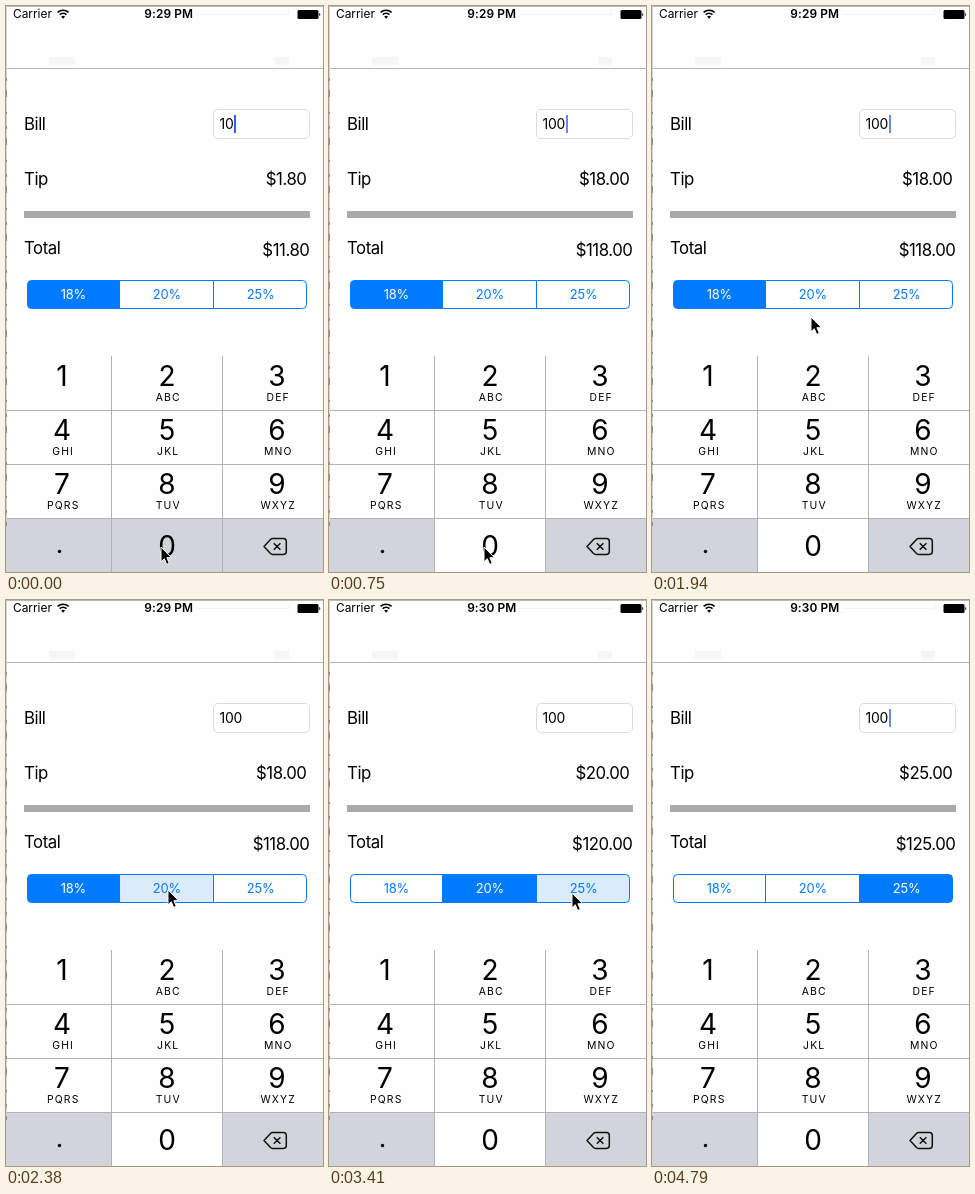
An HTML page for the animation above (4.89 s loop, 317 px wide and 566 px high).

```html
<!DOCTYPE html>
<html lang="en">
<head>
<meta charset="utf-8">
<title>Tip calculator</title>
<style>
  html, body { margin: 0; width: 100%; height: 100%; overflow: hidden; background: #fefefe; }
  svg { display: block; width: 317px; height: 566px; font-family: Inter, Roboto, sans-serif; cursor: default; }
  .label { font-size: 16.8px; letter-spacing: -.45px; }
  .end { text-anchor: end; }
  .mid { text-anchor: middle; }
  .seg { font-size: 12.9px; letter-spacing: -.2px; }
  .digit { font-size: 28px; }
  .sub { font-size: 10.4px; letter-spacing: 1.15px; }
</style>
</head>
<body>
<svg id="stage" viewBox="0 0 317 566">
  <rect width="317" height="566" fill="#fefefe"/>

  <!-- window edge and navigation bar -->
  <path d="M0 .5H317" stroke="#b9b9b9"/>
  <path d="M.5 0V566" stroke="#d4d4d4"/>
  <path d="M.5 72V520" stroke="#8d8f96" stroke-dasharray="3 9 7 15 2 12"/>
  <path d="M43 51h26v8h-26zM269 51h14v8h-14z" fill="#f6f6f6"/>
  <path d="M190 8.5H282.500V3" fill="none" stroke="#f3f3f3"/>
  <path d="M1 62.500H317" stroke="#b4b4b4"/>

  <!-- status bar -->
  <text x="7" y="12.300" font-size="11.900">Carrier</text>
  <g fill="none" stroke="#000" stroke-width="1.600">
    <path d="M51.600 6.400a8 8 0 0 1 11 0M53.700 8.700a5 5 0 0 1 6.800 0"/>
  </g>
  <path d="M57.100 12.700l-2-2.100a3 3 0 0 1 4 0z"/>
  <text id="clock" class="mid" x="162.700" y="12.300" font-size="11.900" font-weight="600" letter-spacing=".1"></text>
  <rect x="291.500" y="4" width="21" height="9" rx="1.500"/>
  <path d="M313.300 6.700q2 1.800 0 3.600z"/>

  <!-- bill form -->
  <g class="label">
    <text x="18" y="124">Bill</text>
    <text x="18" y="179">Tip</text>
    <text x="18" y="248">Total</text>
    <text id="tip" class="end" x="300.500" y="179"></text>
    <text id="total" class="end" x="303.500" y="250"></text>
  </g>
  <rect x="207.500" y="103.500" width="96" height="29" rx="4.500" fill="#fff" stroke="#dcdcdc"/>
  <text id="bill" x="213.500" y="123" font-size="13.900" letter-spacing="-.25"></text>
  <rect id="caret" y="109" width="2" height="18" fill="#3560e6"/>
  <rect x="18" y="205" width="286" height="7" fill="#aaa"/>

  <g id="segments"></g>
  <g id="keypad"></g>
  <path id="pointer" d="M0 0V14.800L3.300 11.700L5.700 17.400L8.300 16.300L5.900 10.700H10.500Z" stroke="#fff" stroke-width="1"/>
</svg>

<script>
const LOOP = 4890, BLUE = "#007aff", GREY = "#d1d4da";
const $ = id => document.getElementById(id);

function add(parent, tag, attrs, text) {
  const el = document.createElementNS("http://www.w3.org/2000/svg", tag);
  for (const key in attrs) el.setAttribute(key, attrs[key]);
  if (text) el.textContent = text;
  return parent.appendChild(el);
}

// Segmented control
const rates = [18, 20, 25];
const shapes = [
  "M113.500 274.500H25.500a4 4 0 0 0-4 4V298.500a4 4 0 0 0 4 4H113.500Z",
  "M113.500 274.500H207.500V302.500H113.500Z",
  "M207.500 274.500H296.500a4 4 0 0 1 4 4V298.500a4 4 0 0 1-4 4H207.500Z"
];
const segments = rates.map((rate, i) => ({
  box: add($("segments"), "path", { d: shapes[i], stroke: BLUE }),
  label: add($("segments"), "text", { class: "seg mid", x: [67.4, 160.9, 254.6][i], y: 293.2 }, rate + "%")
}));

// Keypad
const pad = $("keypad");
const columns = [56, 161, 271];
const letters = ["", "ABC", "DEF", "GHI", "JKL", "MNO", "PQRS", "TUV", "WXYZ"];
add(pad, "path", { d: "M1 512H105V566H1ZM217 512H317V566H217Z", fill: GREY });
const zeroKey = add(pad, "rect", { x: 106, y: 513, width: 110, height: 53 });
add(pad, "path", {
  d: "M105.500 350V566M216.500 350V566M1 404.500H317M1 458.500H317M1 512.500H317",
  stroke: "#b0b2b6"
});
letters.forEach((word, i) => {
  const x = columns[i % 3], y = 380 + 54 * Math.floor(i / 3);
  add(pad, "text", { class: "digit mid", x, y }, String(i + 1));
  add(pad, "text", { class: "sub mid", x: x + 1.2, y: y + 15 }, word);
});
add(pad, "text", { class: "digit mid", x: 161, y: 549.5 }, "0");
add(pad, "circle", { cx: 53.5, cy: 545.5, r: 1.7 });
add(pad, "path", {
  d: "M258 540.500L264.500 533.500Q265.400 532.600 266.700 532.600H277.500Q280.300 532.600 280.300 535.400" +
     "V545.600Q280.300 548.400 277.500 548.400H266.700Q265.400 548.400 264.500 547.500ZM267.800 537.200l6.600 6.600m0-6.600l-6.600 6.600",
  fill: "none", stroke: "#111", "stroke-width": 1.5, "stroke-linejoin": "round"
});

// Pointer track: time, x, y
const track = [
  [0, 155, 541], [1050, 155, 541], [1200, 155, 505], [1500, 155, 405], [1790, 156, 328],
  [2090, 161, 293], [2230, 162, 290], [2530, 162, 290], [2970, 243, 293], [3560, 243, 293],
  [3710, 248, 335], [3860, 250, 394], [4010, 238, 452], [4150, 215, 505], [4300, 190, 535],
  [4600, 162, 541]
];

function pointerAt(t) {
  const i = track.findIndex(p => p[0] > t);
  if (i < 0) return track[track.length - 1].slice(1);
  const a = track[i - 1], b = track[i];
  const k = (t - a[0]) / (b[0] - a[0]);
  return [1, 2].map(n => Math.round(a[n] + (b[n] - a[n]) * k));
}

// The screen refreshes in coarse steps
function snap(t) {
  return t < 1200 ? t : 1200 + Math.floor((t - 1197) / 147.4) * 147.4 + 3;
}

function caretOn(t) {
  if (t < 1300) return true;
  const phase = (t - 2680) / 930;
  return phase - Math.floor(phase) < .55;
}

function render(now) {
  const time = now % LOOP, t = snap(time);
  const bill = time < 600 ? 10 : 100;
  const chosen = time < 2530 ? 0 : time < 3560 ? 1 : 2;
  const pressed = time >= 2380 && time < 2530 ? 1 : time >= 3410 && time < 3560 ? 2 : -1;
  const tip = bill * rates[chosen] / 100;

  $("clock").textContent = time < 3270 ? "9:29 PM" : "9:30 PM";
  $("bill").textContent = bill;
  $("tip").textContent = "$" + tip.toFixed(2);
  $("total").textContent = "$" + (bill + tip).toFixed(2);

  $("caret").setAttribute("x", bill < 100 ? 228 : 237);
  $("caret").setAttribute("opacity", caretOn(t) ? (time < 600 ? 1 : .75) : 0);

  segments.forEach(({ box, label }, i) => {
    box.setAttribute("fill", i === chosen ? BLUE : i === pressed ? "#d9ebfd" : "#fff");
    label.setAttribute("fill", i === chosen ? "#fff" : BLUE);
  });

  const down = time < 150 || (time >= 600 && time < 750);
  zeroKey.setAttribute("fill", down ? GREY : "#fefefe");

  $("pointer").setAttribute("transform", `translate(${pointerAt(t)})`);
  $("pointer").setAttribute("visibility", time < 4790 ? "visible" : "hidden");
}

let start;
function tick(now) {
  if (start === undefined) start = now;
  render(now - start);
  requestAnimationFrame(tick);
}
render(0);
requestAnimationFrame(tick);
</script>
</body>
</html>
```
